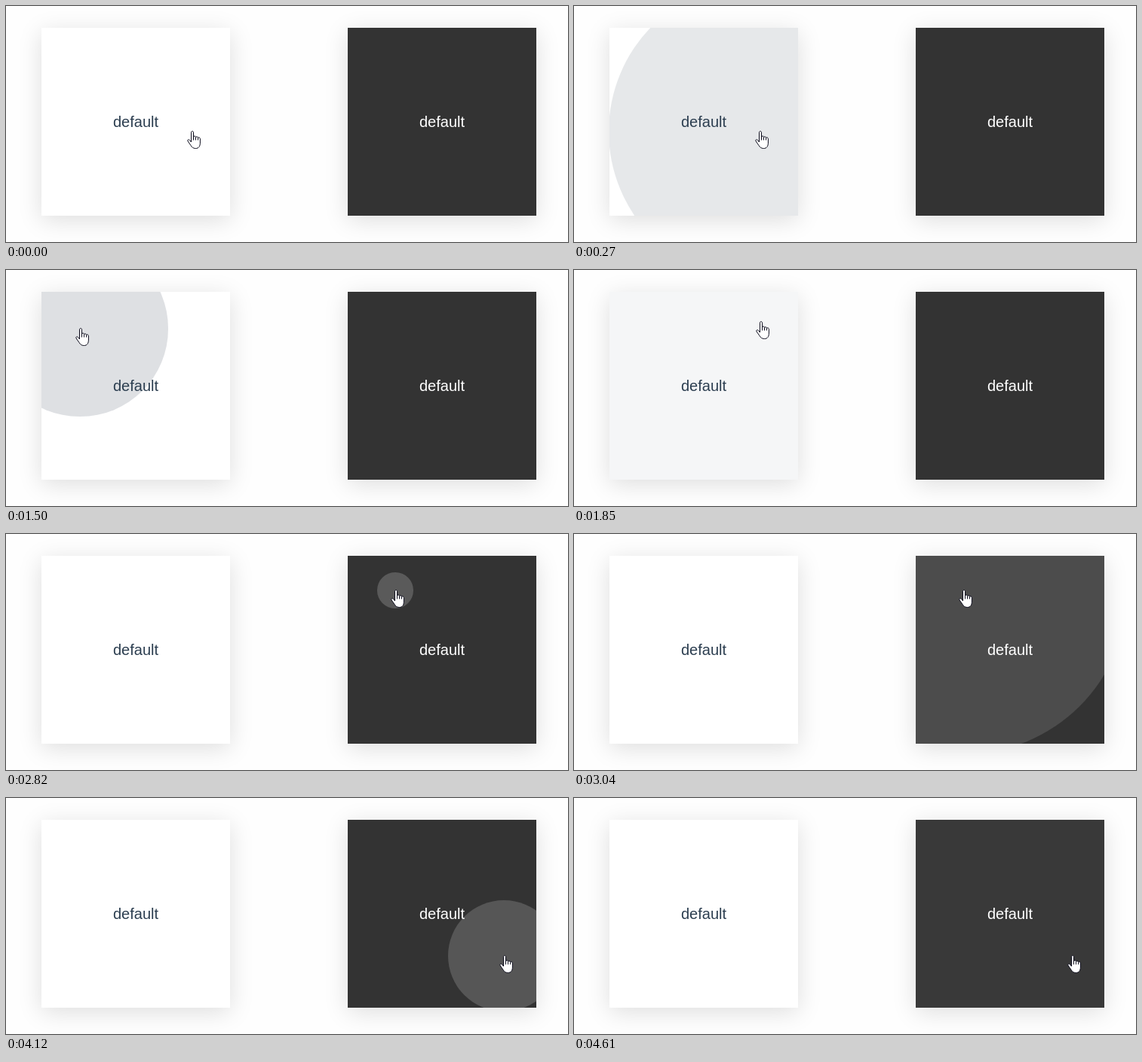
Animation, 745 px wide and 314 px high, one loop 4.68 s. Source, as an HTML page:

```html
<!DOCTYPE html>
<html lang="en">
<head>
<meta charset="utf-8">
<title>Ripple cards</title>
<style>
  html, body { margin: 0; width: 100%; height: 100%; overflow: hidden; background: #fefefe; }
  .card {
    position: absolute; top: 29px; width: 250px; height: 250px;
    font: 20px/250px "Liberation Sans", Arial, sans-serif; text-align: center;
    box-shadow: 0 6px 30px rgba(0, 0, 0, .13);
  }
  .light { left: 47px; background: #fff; color: #2c3e50; }
  .dark { left: 453px; background: #333; color: #fff; }
  .clip { position: absolute; inset: 0; overflow: hidden; }
  .wave { position: absolute; border-radius: 50%; background: currentColor; opacity: 0; }
  .card span { position: relative; }
  #hand { position: absolute; left: 0; top: 0; overflow: visible; }
</style>
</head>
<body>
<div class="card light"><div class="clip"><div class="wave"></div></div><span>default</span></div>
<div class="card dark"><div class="clip"><div class="wave"></div></div><span>default</span></div>
<svg id="hand" width="18" height="24" fill="#fff" stroke="#0c0c1c" stroke-width="1" stroke-linejoin="round">
  <path d="M5.5 15V2.2C5.5 .1 8.5 .1 8.5 2.2V8C9 6.5 11.5 6.8 11.5 8.5C12 7.5 14.3 7.7 14.5 9.3C15.2 8.5 17.4 8.8 17.4 10.8V16C17.4 20.5 15.5 23.5 11.5 23.5C8 23.5 6.5 22 5 19.5L1 13.8C.2 12.2 2 11 3.4 12.3Z"/>
  <path fill="none" d="M8.5 8V12.5M11.5 8.5V12.5M14.5 9.3V12.5"/>
</svg>
<script>
const LOOP = 4680, SIZE = 250, TOP = 29, GROW = 400, FADE = 150;
const lefts = [47, 453];
const waves = document.querySelectorAll('.wave');
const hand = document.getElementById('hand');

// The picture advances in steps: [first, last, count]
const ticks = [
  [0, 0, 1], [60, 550, 8], [620, 1040, 7], [1170, 1170, 1], [1370, 1850, 8], [1920, 2340, 7],
  [2820, 3040, 4], [3090, 3300, 4], [3370, 3590, 4], [4120, 4610, 8]
].flatMap(([first, last, count]) => Array.from({ length: count }, (_, i) =>
  count === 1 ? first : Math.round((first + (last - first) * i / (count - 1)) / 10) * 10));

const clicks = [
  { card: 0, x: 246, y: 167, start: 12, release: 445 },
  { card: 0, x: 98, y: 78, start: 1330, release: 1770 },
  { card: 1, x: 516, y: 75, start: 2799, release: 3200 },
  { card: 1, x: 660, y: 210, start: 4051, release: 4505 }
];

const hold = () => 0;
const speedUp = u => u * u;
const slowDown = u => u * (2 - u);
// Each stop: time, position, easing towards the next stop
const path = [
  [0, 240, 166, hold], [410, 240, 166, speedUp], [550, 197, 145, slowDown],
  [1040, 92, 78, hold], [1170, 92, 77, hold], [1640, 92, 77, speedUp],
  [1850, 241, 68, slowDown], [2340, 510, 74, hold], [3160, 510, 74, speedUp],
  [3300, 548, 146, slowDown], [3590, 654, 209, hold], [LOOP, 654, 209, hold]
];

const clamp = u => Math.min(1, Math.max(0, u));

// CSS ease-out: cubic-bezier(0, 0, .58, 1)
function easeOut(u) {
  let low = 0, high = 1, s = .5;
  for (let i = 0; i < 24; i++) {
    s = (low + high) / 2;
    if (3 * s * s * (1 - s) * .58 + s ** 3 < u) low = s; else high = s;
  }
  return s * s * (3 - 2 * s);
}

function drawWave({ card, x, y, start, release }, t) {
  const cx = x - lefts[card], cy = y - TOP;
  const reach = Math.hypot(Math.max(cx, SIZE - cx), Math.max(cy, SIZE - cy));
  const p = easeOut(clamp((t - start) / GROW));
  const r = reach * p;
  Object.assign(waves[card].style, {
    left: cx - r + 'px', top: cy - r + 'px', width: 2 * r + 'px', height: 2 * r + 'px',
    opacity: (.2 - .1 * p) * (1 - clamp((t - release) / FADE))
  });
}

function drawHand(t) {
  const i = path.findLastIndex(stop => stop[0] <= t);
  const [t0, x0, y0, ease] = path[i], [t1, x1, y1] = path[i + 1];
  const k = ease((t - t0) / (t1 - t0));
  const x = Math.round(x0 + (x1 - x0) * k), y = Math.round(y0 + (y1 - y0) * k);
  hand.style.transform = `translate(${x}px, ${y}px)`;
}

function draw(now) {
  const time = now % LOOP;
  const t = ticks.findLast(tick => tick <= time);
  waves.forEach(wave => wave.style.opacity = 0);
  const click = clicks.find(c => t >= c.start && t < c.release + FADE);
  if (click) drawWave(click, t);
  drawHand(t);
}

const begin = performance.now();
function loop() {
  draw(performance.now() - begin);
  requestAnimationFrame(loop);
}
loop();
</script>
</body>
</html>
```
